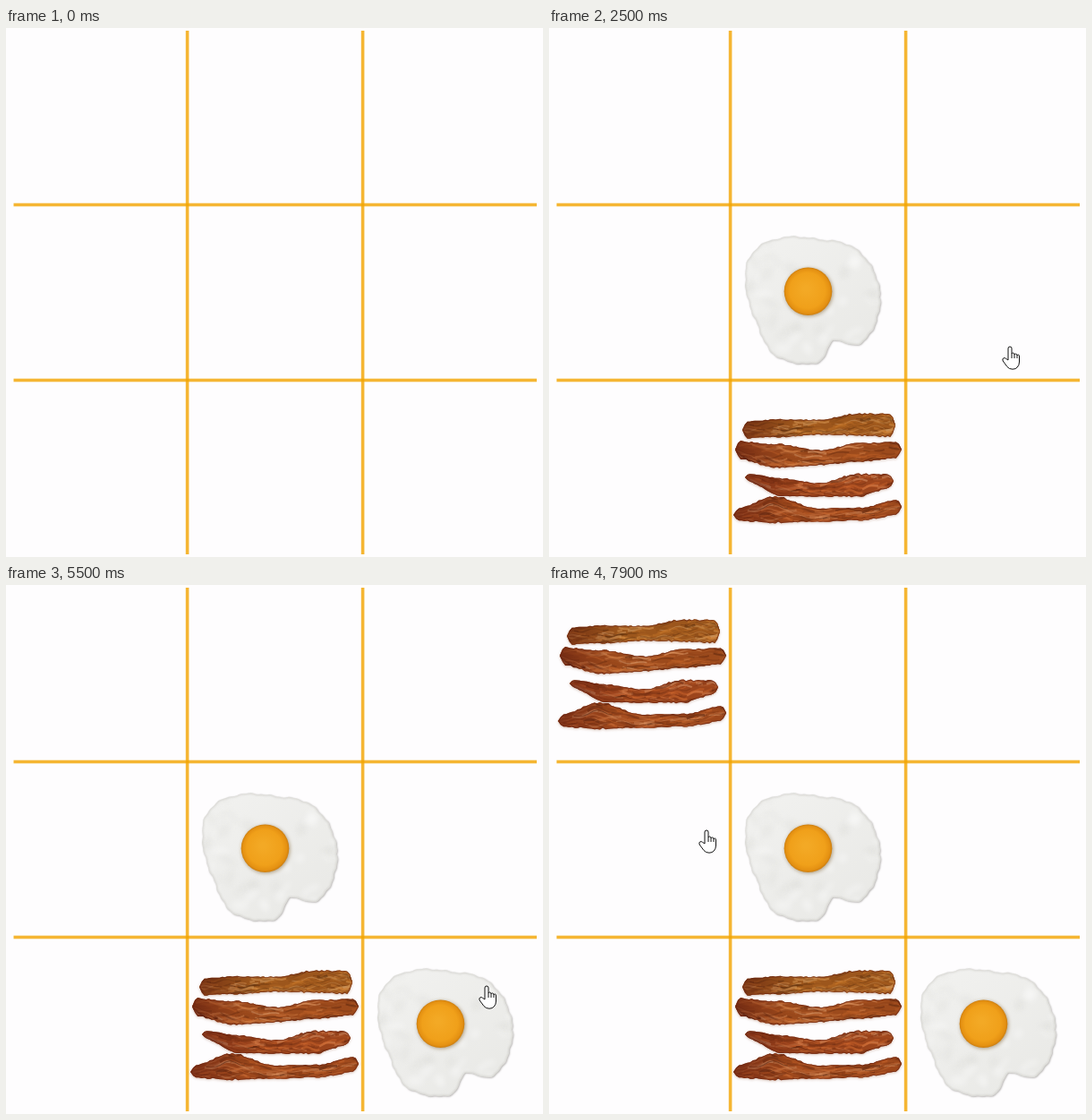
An HTML page with a canvas that plays this animation: 600 px wide and 591 px high, repeating every 8 s.

```html
<!DOCTYPE html>
<html lang="en">
<head>
<meta charset="utf-8">
<title>Breakfast tic-tac-toe</title>
<style>
html, body { margin: 0; width: 100%; height: 100%; overflow: hidden; background: #fefdfe; }
canvas { display: block; }
</style>
</head>
<body>
<canvas id="stage" width="600" height="591"></canvas>
<script>
const W = 600, H = 591, CELL = 196, LOOP = 8000, STEP = 100;
const ctx = document.getElementById('stage').getContext('2d');
const ease = k => k * k * (3 - 2 * k);
const mix = (a, b, k) => a + (b - a) * k;

function seeded(seed) {
  return () => (seed = (seed * 16807) % 2147483647) / 2147483647;
}

function sprite(paint) {
  const c = document.createElement('canvas');
  c.width = W;
  c.height = H;
  paint(c.getContext('2d'));
  return c;
}

function outline(pts) {
  const p = new Path2D();
  pts.forEach(([x, y]) => p.lineTo(x, y));
  p.closePath();
  return p;
}

/* ---------- egg, placed in the middle cell ---------- */
// bulges and dents of the white: angle, height, spread in degrees
const bumps = [[66, -23, 10], [125, 4, 12], [157, -3, 12], [216, 14, 19], [276, -6, 15]];

function eggRadius(deg) {
  const ripple = .6 * Math.sin(deg * .31) + .4 * Math.sin(deg * .73);
  return bumps.reduce((r, [at, h, s]) => r + h * Math.exp(-(((deg - at) / s) ** 2) / 2), 73 + ripple);
}

function paintEgg(g) {
  const rnd = seeded(41), pts = [];
  for (let d = 0; d < 360; d += 2) {
    const a = d * Math.PI / 180, r = eggRadius(d);
    pts.push([297 + r * Math.cos(a), 303 + r * Math.sin(a)]);
  }
  const edge = outline(pts);

  g.save();
  g.shadowColor = 'rgba(90,85,80,.45)';
  g.shadowBlur = 2;
  g.shadowOffsetX = g.shadowOffsetY = .7;
  const white = g.createLinearGradient(240, 235, 345, 370);
  white.addColorStop(0, '#f1f1ef');
  white.addColorStop(1, '#e9e9e6');
  g.fillStyle = white;
  g.fill(edge);
  g.restore();

  g.save();
  g.clip(edge);
  g.filter = 'blur(3px)';
  for (let i = 0; i < 60; i++) {
    g.fillStyle = i % 2 ? 'rgba(255,255,255,.35)' : 'rgba(200,200,195,.16)';
    g.beginPath();
    g.ellipse(225 + rnd() * 144, 236 + rnd() * 134, 3 + rnd() * 9, 2 + rnd() * 4, rnd() * 3, 0, 7);
    g.fill();
  }
  g.filter = 'blur(1px)';
  g.strokeStyle = 'rgba(170,167,160,.4)';
  g.lineWidth = 2;
  g.stroke(edge);
  g.restore();

  g.save();
  g.shadowColor = 'rgba(110,75,20,.5)';
  g.shadowBlur = 4;
  g.shadowOffsetX = g.shadowOffsetY = 1;
  const yolk = g.createRadialGradient(287, 291, 3, 289.5, 294.3, 27);
  yolk.addColorStop(0, '#f3a925');
  yolk.addColorStop(.7, '#f0a01a');
  yolk.addColorStop(.9, '#e59112');
  yolk.addColorStop(1, '#cb7d10');
  g.fillStyle = yolk;
  g.beginPath();
  g.arc(289.5, 294.3, 26.8, 0, 7);
  g.fill();
  g.restore();
}

/* ---------- bacon, placed in the bottom middle cell ---------- */
// middle line and thickness at five even places along each strip
const strips = [
  { x0: 216, x1: 387, hue: 22, mid: [449, 447, 446, 443, 444], thick: [20, 21, 18, 26, 27] },
  { x0: 208, x1: 394, hue: 16, mid: [471, 478, 480, 474, 471], thick: [21, 28, 18, 22, 19] },
  { x0: 219, x1: 385, hue: 14, mid: [502, 513, 516, 511, 506], thick: [9, 21, 16, 27, 16] },
  { x0: 206, x1: 394, hue: 15, mid: [544, 538, 544, 543, 535], thick: [14, 31, 16, 15, 19] }
];

function sample(list, u) {
  const f = Math.max(0, Math.min(1, u)) * (list.length - 1);
  const i = Math.min(list.length - 2, Math.floor(f));
  return mix(list[i], list[i + 1], ease(f - i));
}

function paintStrip(g, s, seed) {
  const rnd = seeded(seed), N = 60, up = [], down = [];
  // v runs from -.5 at the top edge to .5 at the bottom edge
  const at = (u, v) => {
    const cap = Math.min(1, Math.sqrt(Math.max(0, Math.min(u, 1 - u) * 30)));
    return [mix(s.x0, s.x1, u), sample(s.mid, u) + v * sample(s.thick, u) * cap];
  };
  for (let i = 0; i <= N; i++) {
    up.push(at(i / N, -.5 + rnd() * .07));
    down.unshift(at(i / N, .5 - rnd() * .07));
  }
  const edge = outline(up.concat(down));
  const tone = light => `hsl(${s.hue + light * .15}, ${82 - light * .35}%, ${light}%)`;

  g.save();
  g.shadowColor = 'rgba(130,70,35,.35)';
  g.shadowBlur = 3;
  g.shadowOffsetY = 1;
  g.fillStyle = tone(36);
  g.fill(edge);
  g.restore();

  g.save();
  g.clip(edge);
  for (let i = 0; i < 130; i++) {
    const v = rnd() - .5, u = rnd() * 1.1 - .1, len = .03 + rnd() * .2, phase = rnd() * 6;
    g.strokeStyle = tone(16 + 50 * rnd());
    g.globalAlpha = .2 + rnd() * .4;
    g.lineWidth = .8 + rnd() * 2.2;
    g.beginPath();
    for (let k = 0; k <= 8; k++) {
      const w = u + len * k / 8;
      g.lineTo(...at(w, v + .07 * Math.sin(w * 40 + phase)));
    }
    g.stroke();
  }
  g.globalAlpha = 1;
  const char = g.createLinearGradient(s.x0, 0, s.x0 + 60, 0);
  char.addColorStop(0, 'rgba(80,15,10,.5)');
  char.addColorStop(1, 'rgba(80,15,10,0)');
  g.fillStyle = char;
  g.fill(edge);
  g.strokeStyle = 'rgba(100,30,15,.6)';
  g.lineWidth = 2;
  g.stroke(edge);
  g.restore();
}

function paintBacon(g) {
  strips.forEach((s, i) => paintStrip(g, s, 311 + i * 977));
}

/* ---------- pointer ---------- */
const hand = new Path2D('M7 16V3Q7 1 9 1Q11 1 11 3V9Q11.3 8 12.5 8Q14 8 14 10Q14.3 9 15.5 9Q17 9 17 11' +
  'Q17.3 10 18.3 10Q19.5 10 19.5 12V18Q19.5 21.5 17.3 24Q15.5 26.2 12 26.2Q8 26.2 6 23.5L1.2 17' +
  'Q.2 14.6 1.8 13.8Q3.2 13.2 4.6 14.4Z');
const knuckles = new Path2D('M11 9V14M14 10V14M17 11V14');

function drawHand([x, y]) {
  ctx.save();
  ctx.translate(x, y);
  ctx.lineJoin = 'round';
  ctx.fillStyle = '#fff';
  ctx.fill(hand);
  ctx.strokeStyle = '#111';
  ctx.lineWidth = 1;
  ctx.stroke(hand);
  ctx.stroke(knuckles);
  ctx.restore();
}

// each glide: start, end, x, y reached
const glides = [
  [0, 1, 315, 256],
  [800, 1300, 544, 456],
  [1300, 1500, 532, 455],
  [2200, 2500, 506, 355],
  [3700, 4000, 528, 447],
  [5900, 6500, 317, 432],
  [6500, 7000, 250, 350],
  [7200, 7900, 167, 273]
];

function handAt(t) {
  return glides.reduce(([x, y], [t0, t1, x1, y1]) => {
    const k = ease(Math.max(0, Math.min(1, (t - t0) / (t1 - t0))));
    return [mix(x, x1, k), mix(y, y1, k)];
  }, [0, 0]);
}

/* ---------- scene ---------- */
const egg = sprite(paintEgg), bacon = sprite(paintBacon);
// start time, picture, shift in cells
const moves = [
  [200, egg, 0, 0],
  [1200, bacon, 0, 0],
  [4900, egg, 1, 1],
  [5900, bacon, -1, -2]
];

function drawGrid() {
  ctx.fillStyle = 'rgba(243,165,0,.8)';
  for (const i of [1, 2]) {
    ctx.fillRect(i * CELL + 4.8, 3, 3.6, 585);
    ctx.fillRect(8.5, i * CELL - .3, 584.5, 3.6);
  }
}

function draw(now) {
  const t = Math.floor((now % LOOP) / STEP) * STEP;
  ctx.fillStyle = '#fefdfe';
  ctx.fillRect(0, 0, W, H);
  drawGrid();
  for (const [start, pic, cx, cy] of moves) {
    if (t >= start) ctx.drawImage(pic, cx * CELL, cy * CELL);
  }
  if (t >= moves[0][0]) drawHand(handAt(t));
}

const begin = performance.now();
function tick() {
  draw(performance.now() - begin);
  requestAnimationFrame(tick);
}
tick();
</script>
</body>
</html>
```
